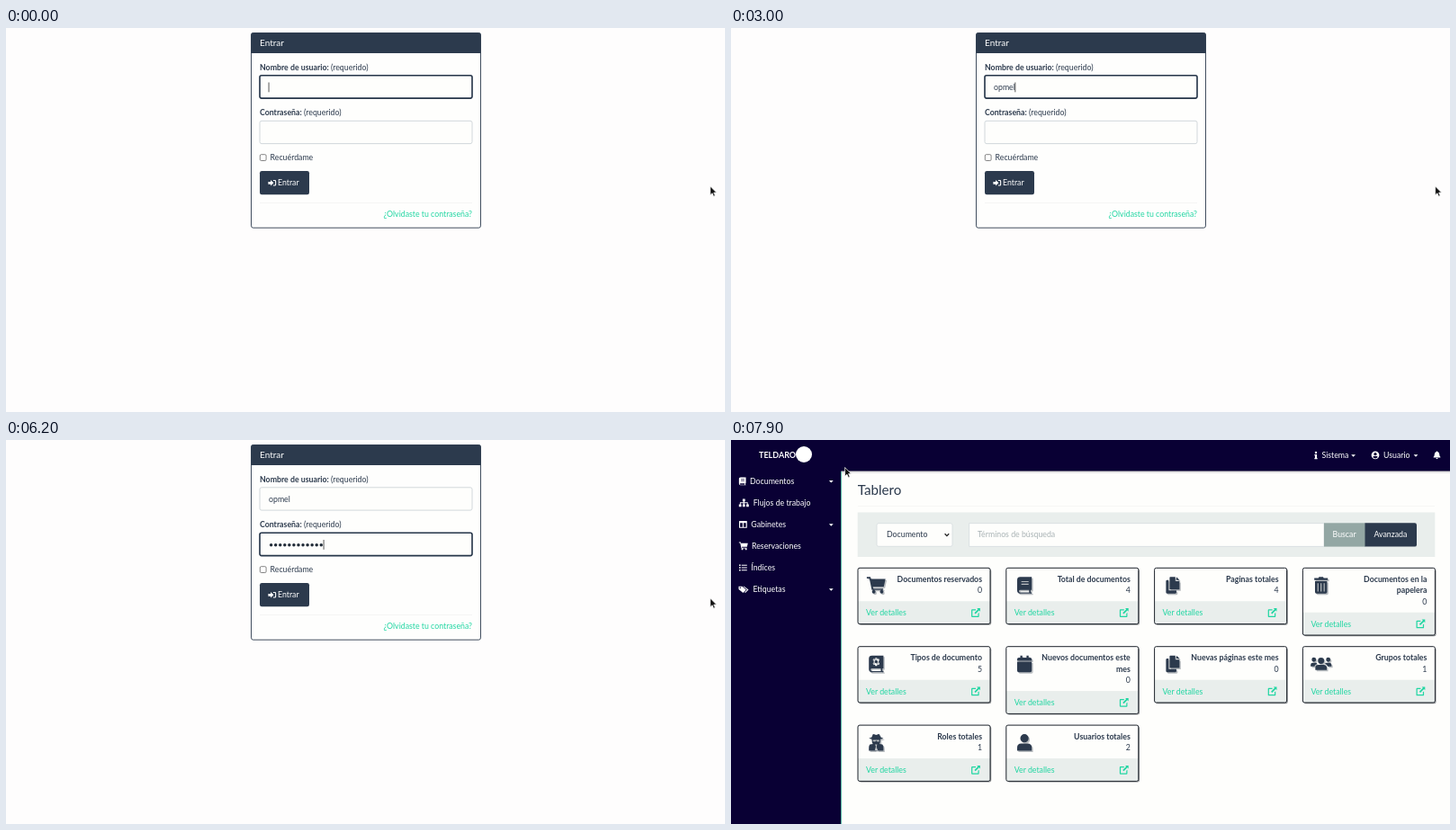
Write an HTML page that moves like this. It is 799 px wide and 427 px high and loops after 8 s.

```html
<!DOCTYPE html>
<html lang="es">
<head>
<meta charset="utf-8">
<style>
html, body { margin: 0; width: 100%; height: 100%; overflow: hidden; background: #fefefc; }
svg { display: block; width: 799px; height: 427px; font: 8.77px Lato, sans-serif; }
text { white-space: pre; }
</style>
</head>
<body>
<svg id="stage" viewBox="0 0 799 427"></svg>
<script>
const LOOP = 8000, STEP = 100;
const INK = '#2c3a4d', LINK = '#20d6a2', NAVY = '#090034', PALE = '#e9eeec', PAPER = '#fefefc';
const USER = 'opmel';
const stage = document.getElementById('stage');

// Icons on a 16 unit square; wide ones overflow sideways.
const ICONS = {
  book: 'M4 0H15V12.5H14V15H15V16H4A3 3 0 0 1 1 13V3A3 3 0 0 1 4 0ZM5 4V5H12V4ZM5 6.5V7.5H12V6.5ZM4 12.5A1.2 1.2 0 0 0 4 15H12.5V12.5Z',
  manual: 'M4 0H15V12.5H14V15H15V16H4A3 3 0 0 1 1 13V3A3 3 0 0 1 4 0ZM4 12.5A1.2 1.2 0 0 0 4 15H12.5V12.5ZM7.3 2H8.7L9.2 3.3L10.5 2.9L11.3 4.3L10.4 5.5V6.5L11.3 7.7L10.5 9.1L9.2 8.7L8.7 10H7.3L6.8 8.7L5.5 9.1L4.7 7.7L5.6 6.5V5.5L4.7 4.3L5.5 2.9L6.8 3.3ZM8 4.5A1.5 1.5 0 0 0 8 7.5A1.5 1.5 0 0 0 8 4.5Z',
  sitemap: 'M5.5 0H10.5V5H9V7H16V11H18V16H13V11H14.5V8.5H9V11H10.5V16H5.5V11H7V8.5H1.5V11H3V16H-2V11H0V7H7V5H5.5Z',
  columns: 'M1 1H15Q16 1 16 2V14Q16 15 15 15H1Q0 15 0 14V2Q0 1 1 1ZM2 5V13H7V5ZM9 5V13H14V5Z',
  cart: 'M-1 0H2.5L3 2H17L15.3 9.5H4.8L5.2 11.3H14.8V12.6H3.8L1.5 1.6H-1ZM4 14.3A1.7 1.7 0 0 1 7.4 14.3A1.7 1.7 0 0 1 4 14.3ZM11.6 14.3A1.7 1.7 0 0 1 15 14.3A1.7 1.7 0 0 1 11.6 14.3Z',
  list: 'M0 1.5H3V4.5H0ZM5 2H16V4H5ZM0 6.5H3V9.5H0ZM5 7H16V9H5ZM0 11.5H3V14.5H0ZM5 12H16V14H5Z',
  tags: 'M-2 2H5L13 9L7 15L-2 8ZM0 4.8A1.3 1.3 0 0 0 2.6 4.8A1.3 1.3 0 0 0 0 4.8ZM7 2H9L18 9L11.5 15L10 13.8L15 9Z',
  copy: 'M5.5 0H10.5V4H14.5V12H5.5Q5 12 5 11.5V.5ZM11.5 0L14.5 3H11.5ZM4 3V13H11.5V15Q11.5 16 10.5 16H2.5Q1.5 16 1.5 15V4Q1.5 3 2.5 3Z',
  trash: 'M1.5 1H5.5L6 0H10L10.5 1H14.5V3H1.5ZM2.2 4H13.8V14.5Q13.8 16 12.3 16H3.7Q2.2 16 2.2 14.5ZM4.5 6V14H5.5V6ZM7.5 6V14H8.5V6ZM10.5 6V14H11.5V6Z',
  calendar: 'M2.5 2H4V0H6V2H10V0H12V2H13.5Q15 2 15 3.5V5H1V3.5Q1 2 2.5 2ZM1 6H15V14.5Q15 16 13.5 16H2.5Q1 16 1 14.5Z',
  users: 'M5 5A3 3 0 0 1 11 5A3 3 0 0 1 5 5ZM2.5 14V12Q2.5 9 5.5 9H10.5Q13.5 9 13.5 12V14ZM-1 4A2.1 2.1 0 0 1 3.2 4A2.1 2.1 0 0 1-1 4ZM12.8 4A2.1 2.1 0 0 1 17 4A2.1 2.1 0 0 1 12.8 4ZM-2 10V9Q-2 7 0 7H2.5Q4 7 4.3 8Q2 8.6 1.6 10.5H-2ZM18 10V9Q18 7 16 7H13.5Q12 7 11.7 8Q14 8.6 14.4 10.5H18Z',
  agent: 'M5 0Q6 0 8 .8Q10 0 11 0L12.3 3L15 4L12 5V7Q12 8.7 11 9.4L14 10Q15 11 15 13V16H1V13Q1 11 2 10L5 9.4Q4 8.7 4 7V5L1 4L3.7 3ZM5 5.5V7H7.3L8 6L8.7 7H11V5.5ZM7 10L7.7 12L6.7 15.5H9.3L8.3 12L9 10Z',
  person: 'M4 4A4 4 0 0 1 12 4A4 4 0 0 1 4 4ZM1 16V13Q1 9 5 9H11Q15 9 15 13V16Z',
  account: 'M0 8A8 8 0 0 1 16 8A8 8 0 0 1 0 8ZM5 6A3 3 0 0 0 11 6A3 3 0 0 0 5 6ZM3 12Q5 14.5 8 14.5Q11 14.5 13 12Q12 10 10.5 10H5.5Q4 10 3 12Z',
  info: 'M5.7 2.3A2.3 2.3 0 0 1 10.3 2.3A2.3 2.3 0 0 1 5.7 2.3ZM5 6H10V13.5H11V16H5V13.5H6V8.5H5Z',
  bell: 'M7 0H9V1.2Q13 2 13 6.5Q13 10 15 11.5V13H1V11.5Q3 10 3 6.5Q3 2 7 1.2ZM6 14H10Q10 16 8 16Q6 16 6 14Z',
  open: 'M10 0H16V6L14 4L7.5 10.5L5.5 8.5L12 2ZM1.5 2H8V4H2V14H12V9.5L14 8V14.5Q14 16 12.5 16H1.5Q0 16 0 14.5V3.5Q0 2 1.5 2Z',
  enter: 'M0 5.5H5V2L11 8L5 14V10.5H0ZM10 2H13.5Q16 2 16 4.5V11.5Q16 14 13.5 14H10V12H13Q14 12 14 11V5Q14 4 13 4H10Z'
};

const rect = (x, y, w, h, fill, extra = '') =>
  `<rect x="${x}" y="${y}" width="${w}" height="${h}" fill="${fill}" ${extra}/>`;
const text = (x, y, s, fill = INK, extra = '') => `<text x="${x}" y="${y}" fill="${fill}" ${extra}>${s}</text>`;
const path = (d, fill, extra = '') => `<path d="${d}" fill="${fill}" ${extra}/>`;
const icon = (name, cx, cy, size, fill = '#fff') => path(ICONS[name], fill,
  `fill-rule="evenodd" transform="translate(${cx} ${cy}) scale(${size / 16}) translate(-8 -8)"`);
const arrow = (cx, cy) => path(`M${cx - 2.4} ${cy - 1}h4.8l-2.4 2.5z`, '#fff');
const BOLD = 'font-weight="700"', END = 'text-anchor="end"';
const clamp = v => Math.max(0, Math.min(1, v));
const typed = (times, t) => times.filter(k => k <= t).length;

function field(y, focus) {
  return rect(282, y + .5, 236, 25.3, PAPER, 'rx="2" stroke="#cdd4d8" stroke-width=".9"') +
    rect(282, y + .5, 236, 25.3, 'none', `rx="2" stroke="#27364a" stroke-width="1.6" opacity="${focus}"`);
}

function login(t) {
  const chars = typed([2300, 2400, 2600, 2700, 2900], t);
  const dots = typed([3600, 3800, 3900, 4200, 5000, 5200, 5400, 5500, 5600, 5700, 5900, 6200], t);
  const passFocus = clamp((t - 3320) / 200);
  const caretOn = !(t >= 400 && t < 900 || t >= 1500 && t < 2100 || t >= 4800 && t < 5000);
  let s = rect(0, 0, 799, 427, '#fefdfd') +
    rect(272.5, 5.5, 255, 216.7, '#fefefd', `rx="2.3" stroke="${INK}" stroke-width=".9"`) +
    path('M272.3 28V7.5Q272.3 5.2 274.6 5.2H525.4Q527.7 5.2 527.7 7.5V28Z', INK) +
    text(282, 20, 'Entrar', '#fff', 'font-size="10"') +
    text(282, 46.6, `<tspan ${BOLD}>Nombre de usuario:</tspan> (requerido)`) +
    text(282, 96.9, `<tspan ${BOLD}>Contraseña:</tspan> (requerido)`) +
    field(52.3, 1 - passFocus) + field(102.8, passFocus) +
    text(292, 69, USER.slice(0, chars), INK, 'id="user"') +
    rect(282.3, 140.7, 6.8, 6.8, '#fff', 'rx="1.3" stroke="#777" stroke-width=".9"') +
    text(293.6, 147.2, 'Recuérdame') +
    rect(282, 159, 55, 26.3, INK, 'rx="2.3"') + icon('enter', 295.8, 172.3, 8.8) +
    text(302, 175.4, 'Entrar', '#fff') + rect(282, 194, 236, .7, '#f1f1f1') +
    text(518, 210.4, '¿Olvidaste tu contraseña?', LINK, END);
  for (let i = 0; i < dots; i++) s += `<circle cx="${294.6 + i * 5.06}" cy="116.7" r="1.75" fill="#222c38"/>`;
  if (t >= 2300 && t < 3000) {
    s += rect(281.5, 80, 237, 30.3, '#0003', 'rx="2"') + rect(281.7, 79.3, 236.6, 30.2, '#3b3c3b', 'rx="2"') +
      text(289, 98, USER, '#fff', 'font-family="Noto Sans, sans-serif" font-size="9.6" font-weight="500"');
  }
  if (caretOn) {
    s += t < 3400 ? rect(291.6, 60.5, .9, 10.8, '#444', 'id="caret"')
      : rect(291.9 + dots * 5.06, 111, .9, 10.8, '#444');
  }
  return s;
}

const MENU = [
  ['book', 12.7, 21, 'Documentos', 1], ['sitemap', 14.3, 24.7, 'Flujos de trabajo'],
  ['columns', 13.4, 22.3, 'Gabinetes', 1], ['cart', 13.8, 23, 'Reservaciones'],
  ['list', 13.4, 22.3, 'Índices'], ['tags', 14, 24.5, 'Etiquetas', 1]
];

function frame(labels) {
  const at = (blank, ready) => labels ? ready : blank;
  let s = rect(0, 0, 799, 427, PAPER) + rect(122, 34, 677, 1.2, '#8d8b98') + rect(122, 35.2, 677, 1.5, '#e4e3e4') +
    rect(0, 0, 799, 34.3, NAVY) + rect(0, 34, 122.3, 393, NAVY) + rect(122.3, 35, .8, 392, '#3cbc9f') +
    icon('info', at(646, 650), 17, 8.6) + arrow(at(690.3, 691.6), 17.2) +
    icon('account', at(714.7, 716), 16.8, 8.8) + arrow(at(760.5, 761), 17.2) + icon('bell', 784.5, 16.8, 8.8);
  MENU.forEach(([name, cx, x, label, more], i) => {
    const y = 45.8 + i * 24.05;
    s += icon(name, cx, y, 8.8);
    if (more) s += arrow(111.3, y + .3);
    if (labels) s += text(x, y + 3.1, label, '#fff');
  });
  if (labels) {
    s += text(656.5, 20, 'Sistema', '#fff') + text(725, 20, 'Usuario', '#fff') +
      text(31, 20, 'TELDARO', '#fff', 'font-size="9" font-weight="700"') + '<circle cx="81" cy="16" r="9" fill="#fff"/>';
  }
  return s;
}

const CARDS = [
  ['cart', 0, 'Documentos reservados'], ['book', 4, 'Total de documentos'],
  ['copy', 4, 'Paginas totales'], ['trash', 0, 'Documentos en la', 'papelera'],
  ['manual', 5, 'Tipos de documento'], ['calendar', 0, 'Nuevos documentos este', 'mes'],
  ['copy', 0, 'Nuevas páginas este mes'], ['users', 1, 'Grupos totales'],
  ['agent', 1, 'Roles totales'], ['person', 2, 'Usuarios totales']
];

function card([name, count, ...title], i) {
  const x = 141 + i % 4 * 164.8, y = 142.3 + Math.floor(i / 4) * 87.4;
  const h = 49.9 + title.length * 12.4, foot = y + h - 25.3;
  let s = rect(x + 1.2, y + 1.2, 147, h, '#8b8e90', 'rx="2.3"') + rect(x, y, 147, h, PAPER, 'rx="2"') +
    rect(x, foot, 147, 25.3, PALE) +
    rect(x, y, 147, h, 'none', 'rx="2" stroke="#1c222b" stroke-width="1"') +
    icon(name, x + 21.7, y + 20.7, 18.5, '#b9bdc0') + icon(name, x + 20.3, y + 19.2, 18.5, INK);
  title.forEach((line, n) => s += text(x + 138, y + 15.4 + n * 12.4, line, INK, BOLD + END.padStart(END.length + 1)));
  return s + text(x + 138, y + 15.4 + title.length * 12.4, count, INK, END) +
    text(x + 9, foot + 16, 'Ver detalles', LINK) + icon('open', x + 131, foot + 12.7, 9.8, LINK);
}

function dashboard() {
  return text(140.7, 61, 'Tablero', INK, 'font-size="15.2"') + rect(141, 73, 641, .6, '#f2f3f2') +
    rect(140.7, 80.5, 641.6, 49.5, PALE) +
    rect(162, 92.7, 84, 25.6, PAPER, 'rx="2" stroke="#d5dcdf" stroke-width=".8"') + text(173, 108.4, 'Documento') +
    path('M237.6 104.2l2.3 2.4l2.3-2.4', 'none', 'stroke="#222" stroke-width="1.3"') +
    rect(264.7, 92.7, 394.3, 25.6, PAPER, 'stroke="#d5dcdf" stroke-width=".8"') +
    text(274, 108.4, 'Términos de búsqueda', '#a9b3b5') +
    rect(659, 92.3, 46, 26.3, '#93a7a4') + text(668.6, 108.4, 'Buscar', '#fff') +
    path('M704.5 92.3H759.8Q762 92.3 762 94.5V116.4Q762 118.6 759.8 118.6H704.5Z', INK) +
    text(714.5, 108.4, 'Avanzada', '#fff') + CARDS.map(card).join('');
}

function pointer(t) {
  const sweep = clamp((t - 7000) / 500), ease = sweep * sweep * (3 - 2 * sweep);
  const settle = clamp((t - 7700) / 200);
  const x = 782.6 - 620 * ease - 36 * settle, y = 176 - 130 * ease - 15.5 * settle;
  return path('M0 0V9.8L2.3 7.7L3.9 11.2L5.5 10.5L4 7.1H7Z', '#111',
    `stroke="#fff" stroke-width=".7" transform="translate(${x} ${y})"`);
}

let shown = -1;
function tick(now) {
  const t = Math.floor(now % LOOP / STEP) * STEP;
  if (t !== shown) {
    shown = t;
    const view = t < 6500 ? login(t) : frame(t >= 6600) + (t >= 6700 ? dashboard() : '');
    stage.innerHTML = view + pointer(t);
    const caret = document.getElementById('caret');
    if (caret) caret.setAttribute('x', 291.6 + document.getElementById('user').getComputedTextLength());
  }
  requestAnimationFrame(tick);
}
tick(performance.now());
</script>
</body>
</html>
```
